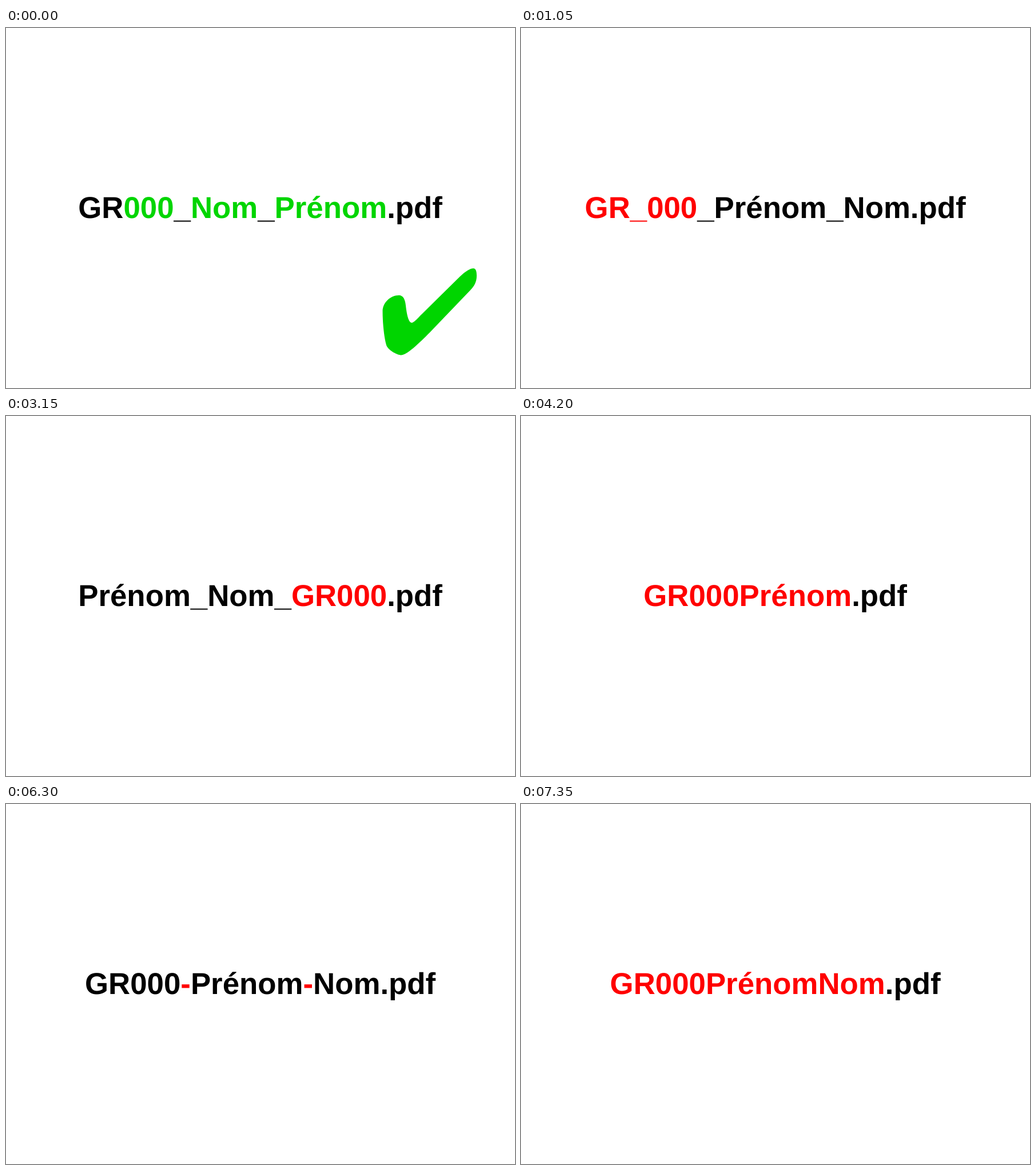
Write an HTML page that moves like this. It is 890 px wide and 629 px high and loops after 8 s.

```html
<!DOCTYPE html>
<html lang="fr">
<head>
<meta charset="utf-8">
<title>Nom de fichier</title>
<style>
  html, body { margin: 0; width: 100%; height: 100%; overflow: hidden; background: #fff; }
  svg { display: block; width: 100%; height: 100%; }
  text { font: bold 52.8px "Liberation Sans", Arial, sans-serif; font-kerning: none; text-anchor: middle; text-rendering: geometricPrecision; }
</style>
</head>
<body>
<svg viewBox="0 0 890 629">
  <text id="label" x="444.6" y="332"></text>
  <path id="tick" fill="#00d500" d="M658.5 495C658.5 480 672 467 687 467C695 467 698 475 699 485C701 502 704 515 709.500 515C713 515 720 507 727 500L794 434C804 424.500 812 420 817 420C822 420 823 426 823 433C823 443 819 451 812 458L741 532C722 551 701 571.500 691 571.500C684 571.500 668 563 665 554C661 540 658.500 515 658.500 495Z"/>
</svg>
<script>
const STEP = 1050, LOOP = 8000;
const BLACK = '#000', RED = '#f00', GREEN = '#00d500';
const label = document.getElementById('label');
const tick = document.getElementById('tick');

// Text between * is marked in the accent colour.
const names = [
  'GR*000*_*Nom*_*Prénom*.pdf',
  '*GR_000*_Prénom_Nom.pdf',
  'GR000_*Prénom_Nom*.pdf',
  'Prénom_Nom_*GR000*.pdf',
  '*GR000Prénom*.pdf',
  '*GR000Nom*.pdf',
  'GR000*-*Prénom*-*Nom.pdf',
  '*GR000PrénomNom*.pdf'
];

function write(name, accent) {
  label.textContent = '';
  name.split('*').forEach((run, i) => {
    const span = document.createElementNS(label.namespaceURI, 'tspan');
    span.setAttribute('fill', i % 2 ? accent : BLACK);
    span.textContent = run;
    label.append(span);
  });
}

let shown = -1;
function draw(time) {
  const step = Math.floor((time % LOOP) / STEP);
  if (step === shown) return;
  shown = step;
  write(names[step], step ? RED : GREEN);
  tick.style.display = step ? 'none' : '';
}

const start = performance.now();
function loop() {
  draw(performance.now() - start);
  requestAnimationFrame(loop);
}
loop();
</script>
</body>
</html>
```
